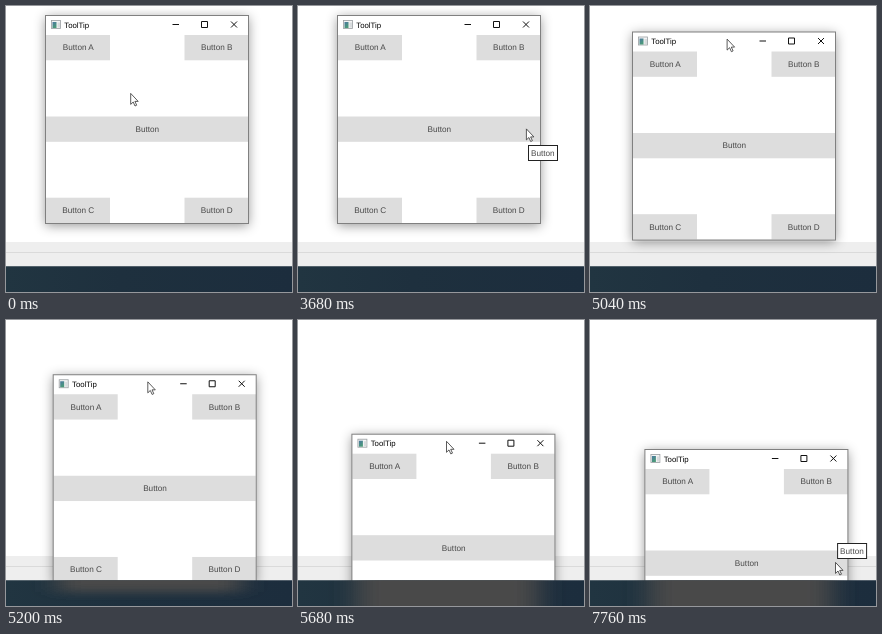
Write an HTML page that moves like this. It is 286x286 px and loops after 8000 ms.

```html
<!DOCTYPE html>
<html lang="en">
<head>
<meta charset="utf-8">
<title>ToolTip</title>
<style>
  html, body { margin: 0; width: 100%; height: 100%; overflow: hidden; background: #fff; }
  svg { display: block; width: 100%; height: 100%; }
  text { font: 8.2px "Liberation Sans", Arial, sans-serif; fill: #484848; text-rendering: geometricPrecision; }
  .title { font-size: 7.8px; fill: #000; }
  .shadow { filter: drop-shadow(0 2px 6px rgba(0, 0, 0, .42)); }
  .controls { fill: none; stroke: #111; }
</style>
</head>
<body>
<svg viewBox="0 0 286 286">
  <defs>
    <linearGradient id="icon" x2=".5" y2="1">
      <stop stop-color="#4b78a0"/><stop offset="1" stop-color="#4a9a78"/>
    </linearGradient>
    <linearGradient id="taskbar">
      <stop stop-color="#213541"/><stop offset=".4" stop-color="#1e303e"/><stop offset="1" stop-color="#1c2d3d"/>
    </linearGradient>
    <filter id="blur" x="-25%" y="-20%" width="150%" height="140%"><feGaussianBlur stdDeviation="13 4"/></filter>
    <clipPath id="bar"><rect y="260.3" width="286" height="26"/></clipPath>
  </defs>

  <rect width="286" height="286" fill="#fff"/>
  <rect y="236" width="286" height="25" fill="#eee"/>
  <rect y="246" width="286" height="1" fill="#dadada"/>

  <g class="dragged">
    <rect class="shadow" x="39.5" y="9.5" width="203" height="208" fill="#fff"/>
    <g id="buttons"></g>
    <rect x="39.5" y="9.5" width="203" height="208" fill="none" stroke="#808080"/>
    <rect x="45.5" y="14.5" width="9" height="8" fill="#f4f4f4" stroke="#9a9fa2" stroke-width=".8"/>
    <rect x="46.5" y="16" width="4" height="6" fill="url(#icon)"/>
    <rect x="51.5" y="16.5" width="2.5" height="5" fill="#d8dcde"/>
    <text class="title" x="58.3" y="21.5">ToolTip</text>
    <path class="controls" d="M166.5 18.5h6.5M195.5 15.5h6v6h-6z"/>
    <path class="controls" d="M225 15.5l6 6m0-6l-6 6"/>
  </g>

  <g clip-path="url(#bar)">
    <rect y="260" width="286" height="26" fill="url(#taskbar)"/>
    <g class="dragged"><rect x="44" y="40" width="183" height="187" fill="#494949" filter="url(#blur)"/></g>
  </g>

  <g id="tip">
    <rect x=".5" y=".5" width="29" height="15" fill="#fff" stroke="#222"/>
    <text x="3" y="10.7">Button</text>
  </g>
  <path id="cursor" d="M.4.4v11l2.5-2.4 1.8 4 1.7-.8-1.8-3.8h3.3z" fill="#fff" stroke="#333" stroke-width=".8"/>
</svg>
<script>
const LOOP = 8000, STEP = 80;
const HOVER_DELAY = 240, TASKBAR_TOP = 260;
const byId = id => document.getElementById(id);

const button = (label, x, y, width) =>
  `<rect x="${x}" y="${y}" width="${width}" height="25.3" fill="#ddd"/>
   <text x="${x + width / 2 + .3}" y="${y + 15.4}" text-anchor="middle">${label}</text>`;
const corners = [..."ABCD"].map((letter, i) =>
  button("Button " + letter, i % 2 ? 178.5 : 40, i < 2 ? 29 : 191.7, 64));
byId("buttons").innerHTML = corners.join("") + button("Button", 40, 110.5, 202);

// Moves are [start, end, x, y]; between them things rest.
const drag = [
  [4880, 5040, 3, 16.5], [5040, 5360, 12.4, 74], [5360, 5680, 14.4, 104.7], [5680, 6160, 15.4, 120],
];
// The pointer is relative to the window, so it follows the drag.
const pointer = [
  [0, 720, 71, 116], [1440, 1680, 115, 98], [1680, 2240, 228, 122.5],
  [3680, 4000, 227, 92], [4080, 4720, 133.7, 16.2], [6480, 7520, 229.7, 122],
];

const linear = k => k;
const smooth = k => k * k * (3 - 2 * k);

function travel(moves, t, x, y, ease) {
  for (const [start, end, toX, toY] of moves) {
    const k = ease(Math.min(1, Math.max(0, (t - start) / (end - start))));
    x += (toX - x) * k;
    y += (toY - y) * k;
  }
  return [x, y];
}

// A tip opens once the pointer has rested on the wide button and closes as it leaves.
const isTipOpen = t => pointer.some(([, end, , y], i) => {
  const leave = i + 1 < pointer.length ? pointer[i + 1][0] : LOOP;
  return y > 110 && y < 136 && t >= end + HOVER_DELAY && t < leave + STEP;
});

const move = (el, x, y) => el.setAttribute("transform", `translate(${x} ${y})`);
const dragged = document.querySelectorAll(".dragged");

function draw(t) {
  const [dx, dy] = travel(drag, t, 0, 0, linear);
  const [px, py] = travel(pointer, t, 124.3, 87, smooth);
  const x = px + dx, y = py + dy;
  dragged.forEach(el => move(el, dx, dy));
  move(byId("cursor"), x, y);

  const fitsBelow = y + 32 < TASKBAR_TOP;
  move(byId("tip"), x + 2, fitsBelow ? y + 16.5 : y - 19);
  byId("tip").setAttribute("visibility", isTipOpen(t) ? "visible" : "hidden");
}

function frame() {
  const t = performance.now() % LOOP;
  draw(Math.floor(t / STEP) * STEP);
  requestAnimationFrame(frame);
}
frame();
</script>
</body>
</html>
```
